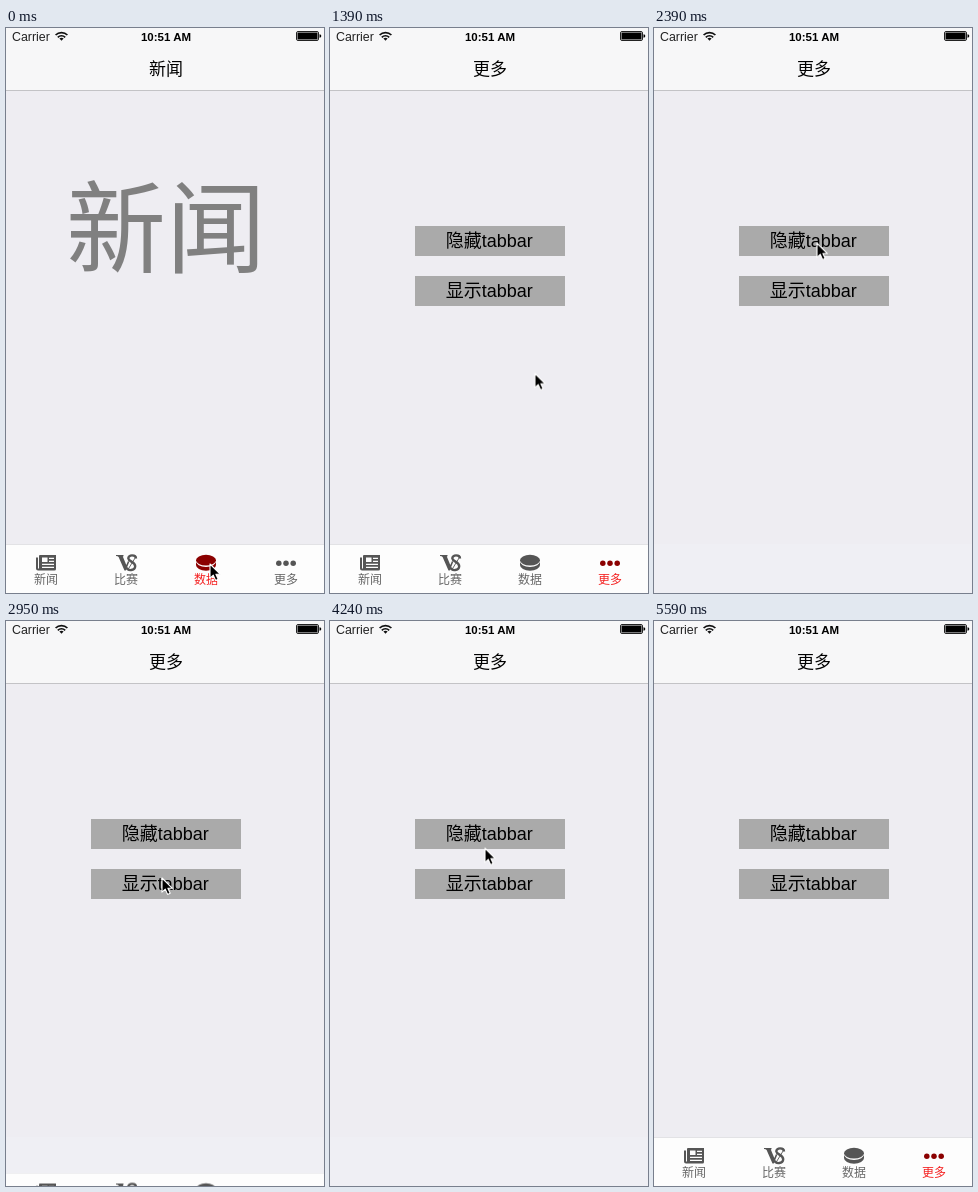
An HTML page for the animation above (6010 ms loop, 318 by 565 pixels).

```html
<!DOCTYPE html>
<html lang="zh-CN">
<head>
<meta charset="utf-8">
<title>Tab bar demo</title>
<style>
  html, body { margin: 0; width: 100%; height: 100%; overflow: hidden; background: #efeef3; }
  svg { display: block; width: 100%; height: 100%; }
  text { font-family: "Liberation Sans", "Noto Sans CJK SC", "Noto Sans CJK", sans-serif; }
  .mid { text-anchor: middle; }
  .title { font-size: 17px; font-weight: 500; }
  .big { font-size: 100px; fill: #808080; }
  .button { font-size: 18px; }
  .label { font-size: 12px; fill: var(--text); }

  .tab { --icon: #555; --text: #666; }
  .icon { fill: var(--icon); }
  .swash { fill: none; stroke: var(--icon); }

  .news, .more, .stats-tab, .more-tab { animation: 6010ms step-end infinite; }
  .news { animation-name: leave; }
  .more { animation-name: enter; }
  .stats-tab { animation-name: deselect; }
  .more-tab { animation-name: select; }
  .bar { animation: bar 6010ms ease-in-out infinite; }
  .cursor { animation: cursor 6010ms ease-in-out infinite; }

  @keyframes leave { 0% { opacity: 1; } 10.6%, 100% { opacity: 0; } }
  @keyframes enter { 0% { opacity: 0; } 10.6%, 100% { opacity: 1; } }
  @keyframes deselect {
    0% { --icon: #8b0000; --text: #f42020; }
    10.3%, 100% { --icon: #555; --text: #666; }
  }
  @keyframes select {
    0% { --icon: #555; --text: #666; }
    10.3%, 100% { --icon: #8b0000; --text: #f42020; }
  }

  /* The bar slides out and back in twice, 250 ms each way. */
  @keyframes bar {
    0%, 31.61%, 51.75%, 65.5%, 83.69%, 100% { transform: translateY(0); }
    35.77%, 47.59%, 69.66%, 79.53% { transform: translateY(49px); }
  }

  @keyframes cursor {
    0%, 0.3% { transform: translate(204px, 535px); }
    7.32%, 17.47% { transform: translate(268px, 541px); }
    27.62%, 39.6% { transform: translate(163px, 214px); }
    43.26% { transform: translate(156px, 256px); }
    56.57% { transform: translate(156px, 256px); animation-timing-function: ease-in; }
    58.24% { transform: translate(155px, 226px); animation-timing-function: ease-out; }
    61.06% { transform: translate(155px, 208px); }
    69.55% { transform: translate(155px, 208px); animation-timing-function: ease-in; }
    70.55% { transform: translate(155px, 226px); animation-timing-function: ease-out; }
    74.71%, 83.03% { transform: translate(155px, 268px); }
    84.86%, 87.2% { transform: translate(278px, 447px); }
    93.01%, 100% { transform: translate(299px, 567px); }
  }
</style>
</head>
<body>
<svg viewBox="0 0 318 565">
  <rect width="318" height="565" fill="#efeff4"/>
  <rect width="318" height="516" fill="#eeedf2"/>

  <!-- navigation bar -->
  <rect width="318" height="62" fill="#f7f7f8"/>
  <rect y="62" width="318" height="1" fill="#c3c3c6"/>

  <!-- status bar -->
  <text x="6" y="13" font-size="12.4" fill="#222">Carrier</text>
  <g fill="none" stroke="#111" stroke-width="1.7">
    <path d="M49.6 7A8.3 8.3 0 0 1 61.4 7"/>
    <path d="M51.8 9.3A5.2 5.2 0 0 1 59.2 9.3"/>
  </g>
  <path d="M53.4 10.6A3.2 3.2 0 0 1 57.6 10.6L55.5 12.8Z" fill="#111"/>
  <text class="mid" x="160" y="13" font-size="11.5" font-weight="700">10:51 AM</text>
  <rect x="290.5" y="3.5" width="22" height="9" rx="1.5" fill="none" stroke="#222"/>
  <rect x="291.5" y="4.5" width="20" height="7" rx=".5"/>
  <path d="M313.5 6.2a1.8 1.8 0 0 1 0 3.6Z"/>

  <g class="news">
    <text class="mid title" x="160" y="46.5">新闻</text>
    <text class="mid big" x="160" y="236.5">新闻</text>
  </g>

  <g class="more">
    <text class="mid title" x="160" y="46.5">更多</text>
    <rect x="85" y="198" width="150" height="30" fill="#aaa"/>
    <rect x="85" y="248" width="150" height="30" fill="#aaa"/>
    <text class="mid button" x="159.3" y="219">隐藏tabbar</text>
    <text class="mid button" x="159.3" y="269">显示tabbar</text>
  </g>

  <g class="bar">
    <rect y="516" width="318" height="49" fill="#fdfdfd"/>
    <rect y="516" width="318" height="1" fill="#e2e2e5"/>

    <g class="tab">
      <path class="icon" d="M34 527H50V541Q50 542.5 48.5 542.5H32Q30 542.5 30 540.5V529.5H32V540.5H33V528Q33 527 34 527Z"/>
      <path d="M36 529.5h5.5v4.5H36ZM43 529.7h5v1.3h-5ZM43 532.7h5v1.3h-5ZM36 535.8h12v1.3H36ZM36 538.8h12v1.3H36Z" fill="#fdfdfd"/>
      <text class="mid label" x="40" y="556">新闻</text>
    </g>

    <g class="tab">
      <path class="icon" d="M110 527H117.5V528.2L116.8 528.6 120.3 537 122 533 123.2 534 119.8 542.5H118.5L112.6 529Q112 528.2 110 528Z"/>
      <path class="swash" d="M130 530.5C130 526.3 122 526.5 122.3 530.3C122.6 533.7 129.3 533.8 129.2 538.3C129 543 121.5 543.2 120.5 539.5" stroke-width="2.4"/>
      <path class="swash" d="M130 528.5L122 541.5" stroke-width=".9"/>
      <text class="mid label" x="120" y="556">比赛</text>
    </g>

    <g class="tab stats-tab">
      <path class="icon" d="M190 532.5V537A10 5.7 0 0 0 210 537V532.5Z"/>
      <ellipse cx="200" cy="533.1" rx="10.2" ry="5.8" fill="#fdfdfd"/>
      <ellipse class="icon" cx="200" cy="532.2" rx="10" ry="5.4"/>
      <text class="mid label" x="200" y="556">数据</text>
    </g>

    <g class="tab more-tab">
      <g class="icon">
        <circle cx="272.8" cy="535.2" r="2.75"/>
        <circle cx="280" cy="535.2" r="2.75"/>
        <circle cx="287.2" cy="535.2" r="2.75"/>
      </g>
      <text class="mid label" x="280" y="556">更多</text>
    </g>
  </g>

  <g class="cursor">
    <path d="M0 1V15.2L3.3 12.2 5.6 17.4 8.2 16.3 5.9 11.3H10.4Z" stroke="#fff" stroke-width="1.1" stroke-linejoin="round"/>
  </g>
</svg>
</body>
</html>
```
